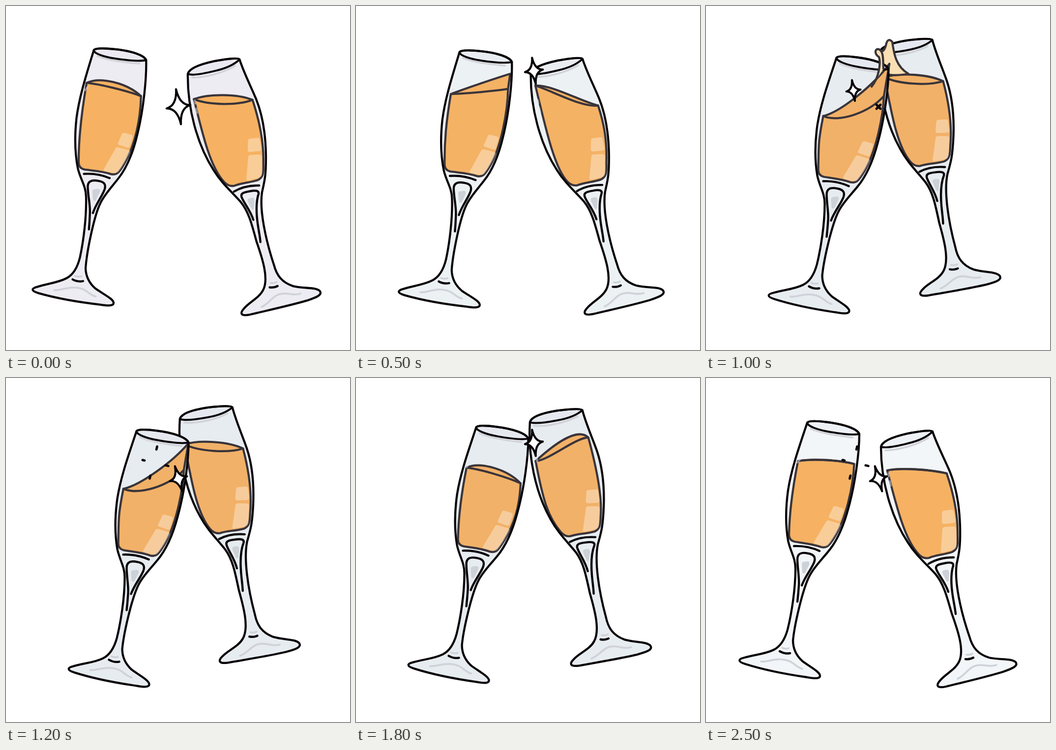
Recreate the animation shown at these times as an HTML page. Size 700 px wide and 700 px high, loop 2.6 s.

```html
<!DOCTYPE html>
<html lang="en">
<head>
<meta charset="utf-8">
<title>Clinking glasses</title>
<style>
html, body { margin: 0; width: 100%; height: 100%; overflow: hidden; background: #fff; }
svg { display: block; width: 100vw; height: 100vh; }
path { stroke-linecap: round; stroke-linejoin: round; }
</style>
</head>
<body>
<svg id="stage" viewBox="0 0 700 700"></svg>
<script>
const LOOP = 2600, STEP = 100;
const INK = '#080306', EDGE = '#39343a';
const stage = document.getElementById('stage');

function add(parent, tag, attrs = {}) {
  const el = document.createElementNS('http://www.w3.org/2000/svg', tag);
  for (const k in attrs) el.setAttribute(k, attrs[k]);
  parent.appendChild(el);
  return el;
}
const line = (g, d, stroke, width) =>
  add(g, 'path', { d, fill: 'none', stroke, 'stroke-width': width });
const shape = (g, d, fill, opacity = 1) => add(g, 'path', { d, fill, opacity });

// Easing between times a and b
const part = (t, a, b) => Math.min(1, Math.max(0, (t - a) / (b - a)));
const smooth = (t, a, b) => { const u = part(t, a, b); return u * u * (3 - 2 * u); };
const bump = (t, a, b) => Math.sin(Math.PI * part(t, a, b));
const mix = (a, b, u) => a.map((v, i) => v + (b[i] - v) * u);

const windUp = t => 1 - smooth(t, 0, 200);
const press = t => smooth(t, 300, 700) - smooth(t, 1800, 2300);

const left = {
  pivot: [203, 356],
  outline: 'M206 91C209 87 225 87 248 90C280 94 308 103 312 114C312 150 304 214 290 264C280 302 266 333 248 354' +
    'C234 371 219 386 211 402C197 428 180 502 177 534C177 551 184 565 196 576C212 588 232 598 232 606' +
    'C232 612 222 612 206 609C164 603 118 594 80 582C64 577 65 572 78 569C98 563 120 562 138 553' +
    'C152 546 161 530 166 512C174 480 182 430 182 388C182 366 172 354 167 331C162 302 162 264 167 228C174 184 189 142 206 91Z',
  rim: 'M206 91C207 86 226 87 248 90C282 94 308 104 312 114C298 117 270 113 248 109C226 105 208 98 206 92Z',
  shade: 'M213 103C236 113 266 117 298 121',
  glint: 'M186 172L191 166',
  tiles: 'M259 262Q261 260 264 261L278 265Q281 266 280 270L274 289Q272 292 269 291L252 285Q249 284 250 281Z' +
    'M244 293Q246 289 250 290L271 296Q276 298 273 303C265 318 257 331 249 340Q246 343 240 342L223 338Q218 337 220 333Z',
  details: 'M179 342Q207 341 231 352M195 422C202 403 214 390 220 375C224 364 219 359 208 357C194 354 186 357 186 369' +
    'C186 387 190 404 189 421C188 437 187 446 186 455M150 556Q160 562 171 560',
  inner: 'M195 379Q195 374 200 374L207 373Q212 374 210 380L202 396Q198 400 196 395Z',
  soft: 'M155 549Q161 552 168 550M112 577C126 578 141 570 157 573C178 575 181 588 196 592',
  // Walls as x for a given height, and the way down one wall and up the other
  outer: y => 187 - .2 * (y - 170),
  inside: y => 302 - .17 * (y - 172),
  walls: (ix, iy, ox, oy) =>
    `C${ix - 2} ${iy + 45} 285 286 262 323C251 341 246 347 234 344C216 337 196 336 180 333` +
    `Q168 330 169 317C170 270 ${ox - 11} ${oy + 55} ${ox} ${oy}Z`,
  sag: 6, lag: .3, wave: 0, restTilt: 6,
  level: t => 172 + 17 * (smooth(t, 700, 1000) - smooth(t, 1800, 2300)),
  slosh: t => 30 * windUp(t) - 41 * bump(t, 400, 1700) + 37 * bump(t, 1600, 2200),
  crest: t => -66 * bump(t, 300, 1600),
  pose(t) {
    const reach = smooth(t, 300, 980) - smooth(t, 1500, 2250), back = windUp(t);
    return [
      59.5 * reach - 20 * back,
      14.5 * reach - back + 4 * bump(t, 1000, 1800),
      -1.6 * back - 3.4 * bump(t, 400, 1000)
    ];
  }
};

const right = {
  pivot: [485, 376],
  outline: 'M356 140C359 127 388 118 410 113C436 108 459 105 461 109C470 136 485 164 496 190C510 224 516 267 517 302' +
    'C518 345 515 355 510 379C505 414 518 474 536 526C542 548 553 562 576 569C598 574 621 570 630 578' +
    'C636 586 624 591 604 598C568 609 528 618 488 628C469 632 468 625 476 616C486 603 507 594 515 577' +
    'C526 554 513 515 500 479C491 448 484 419 467 399C450 380 428 362 411 335C376 282 356 208 356 140Z',
  rim: 'M356 140C358 127 388 118 410 113C436 108 459 105 461 109C450 120 432 128 411 133C388 139 365 143 356 140Z',
  shade: 'M365 147C392 147 427 137 452 122',
  glint: 'M371 194L372 200M374 210L376 219',
  tiles: 'M480 275Q480 271 484 270L500 268Q504 268 504 272L508 290Q508 294 504 295L484 297Q480 297 480 293Z' +
    'M481 308Q481 304 486 303L504 302Q509 302 509 308L510 340Q510 347 504 349L482 355Q477 356 478 350Z',
  details: 'M453 378Q474 365 504 365M493 435C487 416 474 402 469 390C465 381 474 379 485 377C499 374 504 376 503 382' +
    'C497 401 499 423 502 443C505 462 507 469 508 480M528 572Q537 573 544 569',
  inner: 'M481 397Q480 392 485 391L491 390Q495 391 495 397L494 412Q492 418 488 411Z',
  soft: 'M530 563Q537 564 542 561M512 612C528 605 532 591 547 586C564 580 573 590 591 584',
  outer: y => 488 + .43 * (y - 190),
  inside: y => 369 + .13 * (y - 190),
  walls: (ix, iy, ox, oy) =>
    `C${ix + 20} ${iy + 78} 405 330 433 359Q443 369 454 366C468 360 483 360 501 354` +
    `C511 349 513 342 512 321C513 275 ${ox + 13} ${oy + 38} ${ox} ${oy}Z`,
  sag: 9, lag: .17, wave: .2, restTilt: -6,
  level: t => 191 - 14 * bump(t, 400, 1000),
  slosh: t => -72 * bump(t, 400, 1000) + 55 * bump(t, 1350, 2250),
  crest: () => 0,
  pose(t) {
    const reach = smooth(t, 300, 1080) - smooth(t, 1700, 2300), back = windUp(t);
    const bob = bump(t, 1000, 1500) ** 2 + bump(t, 1500, 2000) ** 2;
    return [
      11 * back - 19 * reach,
      -41 * reach * reach - 8 * bob,
      .7 * back + 4 * reach
    ];
  }
};

function buildGlass(glass) {
  const g = glass.group = add(stage, 'g');
  glass.body = shape(g, glass.outline, '#fff');
  shape(g, glass.rim, '#dfdeeb', .25);
  line(g, glass.shade, '#d2d2d9', 3.8);
  line(g, glass.soft, '#d0d2d9', 3.8);
  shape(g, glass.inner, '#cdd2d8');
  glass.liquid = add(g, 'path', { stroke: EDGE, 'stroke-width': 4.3 });
  glass.front = line(g, '', EDGE, 4.3);
  shape(g, glass.tiles, '#fff', .34);
  line(g, glass.glint, 'rgba(225,228,235,.5)', 4);
  line(g, glass.details, INK, 4.4);
  line(g, glass.rim, INK, 4);
  line(g, glass.outline, INK, 4.3);
}

function drawLiquid(glass, t) {
  const active = Math.max(windUp(t), press(t));
  const tilt = glass.slosh(t) + glass.restTilt * (1 - active);
  const level = glass.level(t), crest = glass.crest(t);
  const oy = level - tilt / 2, iy = level + tilt / 2, top = iy + crest;
  const ox = glass.outer(oy), ix = glass.inside(iy), tx = glass.inside(top);
  const middle = -glass.lag * tilt * active - 5 * (1 - active);
  const sway = glass.wave * tilt;

  // Curve from the outer wall to (x, y), bent by `bend` at its middle
  const curve = (x, y, bend) => {
    const control = (u, side) =>
      `${ox + (x - ox) * u} ${oy + (y - oy) * u + bend * 4 / 3 + side * sway}`;
    return `M${ox} ${oy}C${control(.25, -1)} ${control(.75, 1)} ${x} ${y}`;
  };
  const sag = glass.sag * active;
  glass.liquid.setAttribute('d',
    curve(tx, top, middle - sag - .12 * crest) + `L${ix} ${iy}` + glass.walls(ix, iy, ox, oy));
  glass.front.setAttribute('d', curve(ix, iy, middle + sag));
}

const rgb = c => `rgb(${c.map(Math.round)})`;

function drawGlass(glass, t) {
  const [dx, dy, turn] = glass.pose(t);
  glass.group.setAttribute('transform', `translate(${dx} ${dy}) rotate(${turn} ${glass.pivot})`);
  const rest = mix([242, 246, 248], [237, 236, 242], windUp(t));
  glass.body.setAttribute('fill', rgb(mix(rest, [230, 236, 240], press(t))));
  glass.liquid.setAttribute('fill', rgb(mix([246, 178, 98], [242, 177, 104], press(t))));
  drawLiquid(glass, t);
}

const splash = d => add(stage, 'path', { d, fill: '#f9dfb3', stroke: EDGE, 'stroke-width': 4.3 });

buildGlass(right);
const splashes = [splash('M358 92Q364 91 367 76Q371 64 379 73C382 91 384 122 412 138C395 141 378 142 366 138')];
buildGlass(left);
splashes.push(splash('M337 164C352 146 356 116 352 104C342 97 343 86 352 88C362 93 360 110 361 128'));

const sparks = [
  { x: 362, y: 132, size: 1, delay: 0 },
  { x: 351, y: 205, size: 1.33, delay: 800 },
  { x: 300, y: 172, size: .79, delay: 500 }
];
for (const s of sparks) s.el = add(stage, 'path', { stroke: INK });

function star(h) {
  const w = h * .68, p = h * .08;
  return `M0 ${-h}Q${p} ${-p} ${w} 0Q${p} ${p} 0 ${h}Q${-p} ${p} ${-w} 0Q${-p} ${-p} 0 ${-h}Z`;
}

function dashes(r) {
  const k = 3 / r;
  return [[0, -1], [.93, 0], [0, 1], [-.68, 0]].map(([x, y]) =>
    `M${x * r * (1 - k)} ${y * r * (1 - k)}L${x * r * (1 + k)} ${y * r * (1 + k)}`).join('');
}

// A speck opens into a star, then bursts into four dashes
function drawSpark(s, t) {
  const phase = (t - s.delay + LOOP) % (LOOP / 2);
  const isStar = phase >= 300 && phase < 600;
  let d = '', turn = 0;
  if (phase >= 200 && phase < 300) {
    d = 'M-4 -4L4 4M4 -4L-4 4';
  } else if (isStar) {
    d = star(s.size * (17.5 + 9.5 * part(phase, 300, 500) ** 2));
    turn = -8 - 8 * bump(phase, 300, 500);
  } else if (phase >= 600 && phase < 800) {
    d = dashes(s.size * (24 + 14.5 * part(phase, 600, 700)));
    turn = 13;
  }
  s.el.setAttribute('d', d);
  s.el.setAttribute('fill', isStar ? '#fff' : 'none');
  s.el.setAttribute('stroke-width', isStar ? 4.2 : 4.8);
  s.el.setAttribute('transform', `translate(${s.x} ${s.y}) rotate(${turn})`);
}

function draw(t) {
  drawGlass(right, t);
  drawGlass(left, t);
  const rise = 1 - Math.abs(t - 1000) / 200;
  for (const el of splashes) {
    el.setAttribute('visibility', rise > 0 ? 'visible' : 'hidden');
    el.setAttribute('transform', `translate(0 ${135 * (1 - rise)}) scale(1 ${rise})`);
  }
  for (const s of sparks) drawSpark(s, t);
}

const start = performance.now();
function tick() {
  const t = (performance.now() - start) % LOOP;
  draw(Math.floor(t / STEP) * STEP);
  requestAnimationFrame(tick);
}
tick();
</script>
</body>
</html>
```
